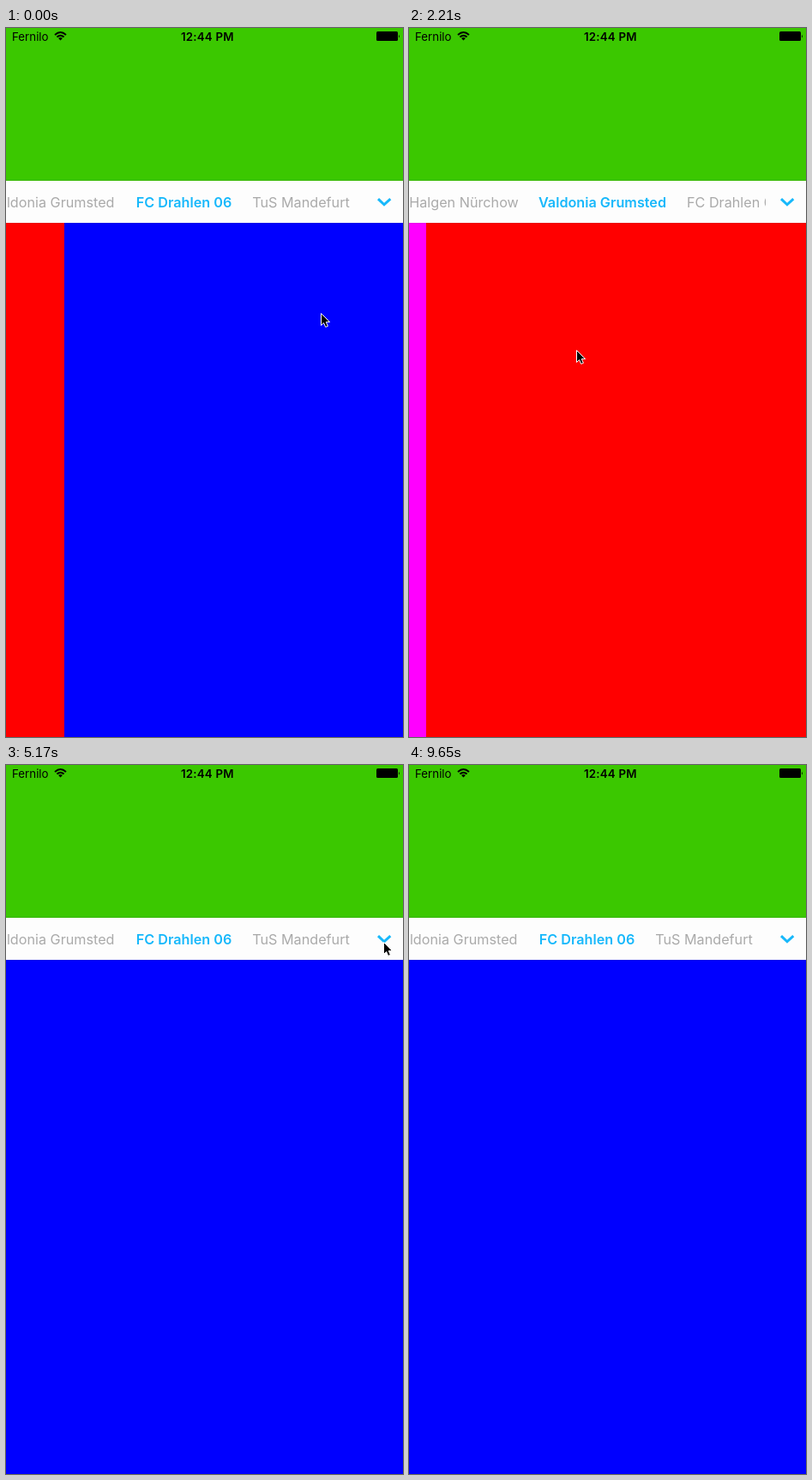
These frames come from a looping animation (463 by 826 pixels, 9.95 s). An HTML page:

```html
<!DOCTYPE html>
<html lang="de">
<head>
<meta charset="utf-8">
<title>Tab pager</title>
<style>
  html, body { margin: 0; width: 100%; height: 100%; overflow: hidden; }
  body { background: #3bc800; font-family: Inter, sans-serif; }
  #stage { position: relative; width: 463px; height: 826px; overflow: hidden; background: #3bc800; }
  #stage > * { position: absolute; }
  .status { top: 2px; font-size: 13.3px; line-height: 16px; color: #000; white-space: nowrap; }
  #clock { left: 204px; font-weight: 600; letter-spacing: .2px; }
  #pages, #menu { left: 0; top: 227px; width: 463px; height: 599px; overflow: hidden; }
  #pages div { position: absolute; width: 463px; height: 599px; }
  #menu { background: #fdfdfd; }
  #bar { left: 0; top: 178px; width: 463px; height: 49px; background: #fdfdfd; box-shadow: 0 0 2px rgba(0, 0, 0, .25); }
  #tabs { left: 0; top: 178px; width: 416px; height: 49px; overflow: hidden; }
  #strip { position: absolute; }
  #strip span {
    position: absolute; top: 0; transform: translateX(-50%);
    font-size: 16.2px; line-height: 50px; white-space: nowrap; color: #aaa;
  }
  #strip span.on { color: #17b8fb; font-weight: 600; }
  svg { left: 0; top: 0; overflow: visible; }
</style>
</head>
<body>
<div id="stage">
  <div class="status" style="left:7px">Fernilo</div>
  <div class="status" id="clock">12:44 PM</div>
  <div id="pages"></div>
  <div id="menu"></div>
  <div id="bar"></div>
  <div id="tabs"><div id="strip"></div></div>
  <svg width="463" height="826">
    <g fill="none" stroke="#000" stroke-width="1.9">
      <path d="M57 8 Q63.5 2 70 8"/>
      <path d="M59.4 10.5 Q63.5 6.8 67.6 10.5"/>
    </g>
    <path d="M61.1 12 Q63.5 9.9 65.9 12 L63.5 14.5Z"/>
    <rect x="432" y="4" width="25" height="11" rx="1.5"/>
    <path d="M458 7.5 q1.6 2 0 4z"/>
    <path d="M434 199.2 L441 205.8 L448.3 199.2" fill="none" stroke="#17b8fb" stroke-width="3"/>
    <path id="cursor" d="M.5 .5 V14.5 L3.6 11.6 L5.7 16.4 L8.4 15.3 L6.3 10.6 H10.6 Z" stroke="#fff" stroke-linejoin="round"/>
  </svg>
</div>
<script>
const LOOP = 9950, STEP = 147.25, WIDTH = 463;
const get = id => document.getElementById(id);

const add = (parent, tag, css, text = '') => {
  const el = document.createElement(tag);
  el.style.cssText = css;
  el.textContent = text;
  return get(parent).appendChild(el);
};

const pages = ['#f0f', '#f00', '#00f'].map(c => add('pages', 'div', `background:${c}`));
const tabs = [
  ['Halgen Nürchow', 77.5],
  ['Valdonia Grumsted', 239],
  ['FC Drahlen 06', 392.5],
  ['TuS Mandefurt', 529]
].map(([name, x]) => add('strip', 'span', `left:${x}px`, name));

// Keys are [step, value, ...]; one step is one refresh of the screen.
const pageKeys = [[0, 1.853], [1, 1.5], [2, 1.13], [3, 1.01], [4, 1], [6, 1], [7, .72], [8, .387],
  [9, .07], [10, 0], [12, 0], [13, .15], [14, .7], [15, .957], [16, 1], [18, 1], [19, 1.35],
  [20, 1.8], [21, 1.98], [22, 2]];
const scrollKeys = [[0, 185], [1, 185], [2, 170], [3, 70], [4, 31], [8, 31], [9, 16], [10, 3], [11, 0],
  [13, 0], [14, 4], [15, 13.5], [16, 28], [17, 31], [19, 31], [20, 75], [21, 160], [22, 184], [23, 185]];
const cursorKeys = [[0, 367, 332], [2, 452, 352], [4, 240, 380], [5, 141, 385], [6, 141, 385],
  [8, 425, 372], [9, 448, 368], [11, 436, 372], [12, 436, 372], [13, 367, 374], [14, 250, 376],
  [15, 195, 375], [16, 230, 350], [18, 400, 285], [19, 238, 275], [20, 160, 270], [22, 399, 260],
  [23, 404, 262], [24, 404, 262], [27, 440, 206]];

function at(keys, step, col = 1) {
  const i = keys.findIndex(k => k[0] >= step);
  if (i < 0) return keys[keys.length - 1][col];
  if (i === 0) return keys[0][col];
  const a = keys[i - 1], b = keys[i];
  return a[col] + (b[col] - a[col]) * (step - a[0]) / (b[0] - a[0]);
}

function menuOpacity(t) {
  if (t >= 3980 && t < 5170) return t < 4120 ? .5 : 1;
  if (t >= 6070 && t < 6970) return t < 6220 ? .5 : 1;
  return 0;
}

// The pointer leaves after the last tap, then crosses the page once.
function cursorAt(t, step) {
  if (t < 7420) return [at(cursorKeys, step), at(cursorKeys, step, 2)];
  if (t < 9070 || t >= 9650) return null;
  const f = Math.floor((t - 9070) / 145) / 3;
  return [410 - 256 * f, 293 + 499 * f];
}

function draw(t) {
  const step = Math.floor((t + 4) / STEP);
  const page = at(pageKeys, step), shown = menuOpacity(t), tip = cursorAt(t, step);
  pages.forEach((el, i) => el.style.left = Math.round((i - page) * WIDTH) + 'px');
  tabs.forEach((el, i) => el.className = i === Math.round(page) ? 'on' : '');
  get('strip').style.left = -at(scrollKeys, step) + 'px';
  get('menu').style.opacity = shown;
  get('tabs').style.opacity = 1 - shown;
  const cursor = get('cursor');
  cursor.style.display = tip ? '' : 'none';
  if (tip) cursor.setAttribute('transform', `translate(${tip.map(Math.round)})`);
}

const start = performance.now();
function tick() {
  draw((performance.now() - start) % LOOP);
  requestAnimationFrame(tick);
}
tick();
</script>
</body>
</html>
```
